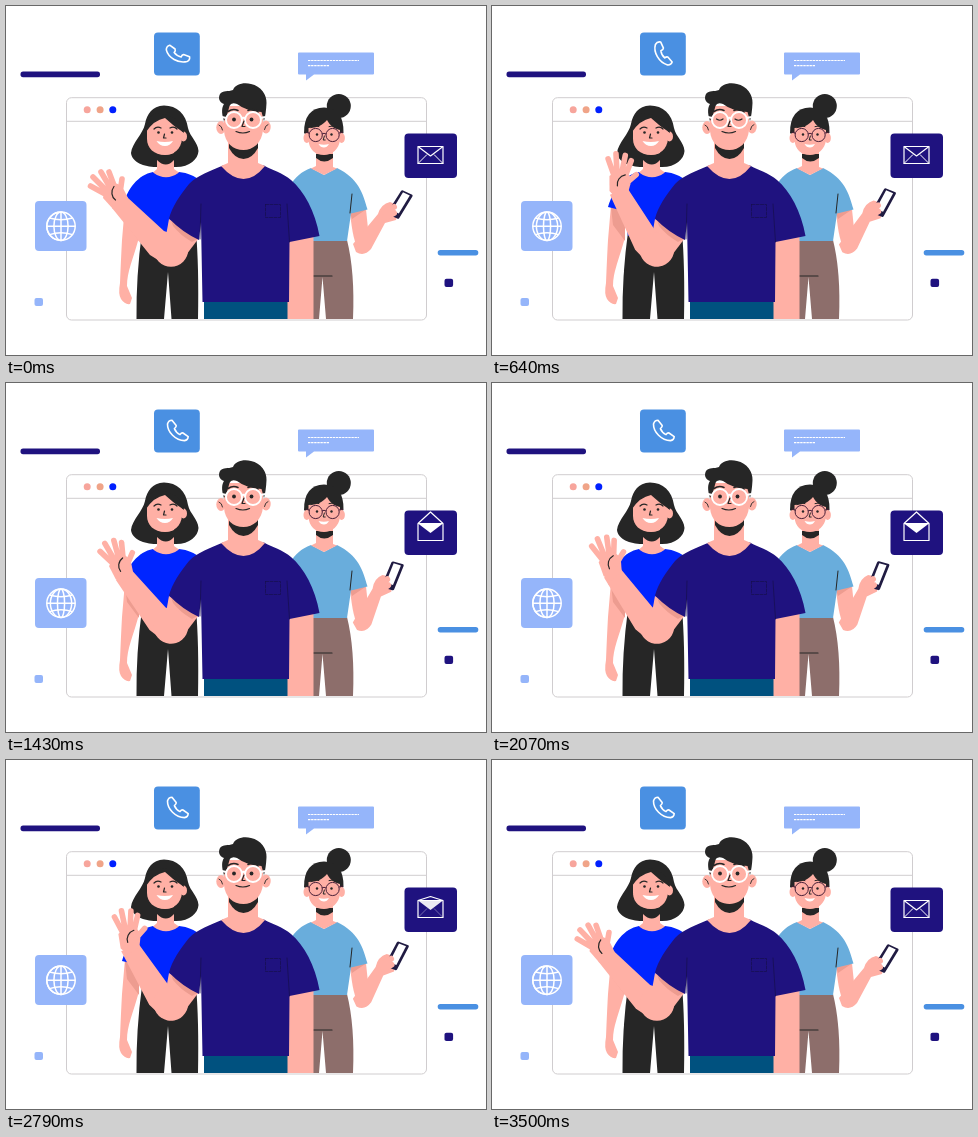
Recreate the animation shown at these times as an HTML page. Size 480 by 349 pixels, loop 3.57 s.

```html
<!DOCTYPE html>
<html lang="en">
<head>
<meta charset="utf-8">
<title>Team online</title>
<style>
html, body { margin: 0; width: 100%; height: 100%; overflow: hidden; background: #fff; }
svg { display: block; width: 100vw; height: 100vh; }
.navy { fill: #1f127f; }
.skin { fill: #ffb0a5; }
.shade { fill: #ed9c90; }
.dark { fill: #262626; }
.pale { fill: #95b5fa; }
.mid { fill: #4a90e2; }
.line { fill: none; stroke: #262626; stroke-linecap: round; stroke-linejoin: round; }
.white { fill: none; stroke: #fff; stroke-linejoin: round; }
.limb { fill: none; stroke: #ffb0a5; stroke-linecap: round; stroke-linejoin: round; }
</style>
</head>
<body>
<svg viewBox="0 0 480 349" stroke-width="1.2">
  <!-- browser window -->
  <rect x="60.5" y="91.7" width="360" height="222.3" rx="5" fill="#fff" stroke="#d0cdcf" stroke-width="1"/>
  <path d="M60.5 115.3H420.5" stroke="#d0cdcf" stroke-width="1"/>
  <circle cx="81.2" cy="103.7" r="3.5" fill="#f7a59c"/>
  <circle cx="94.1" cy="103.7" r="3.5" fill="#f0a488"/>
  <circle cx="106.8" cy="103.7" r="3.5" fill="#0020ff"/>

  <!-- loose decorations -->
  <rect class="navy" x="14.5" y="65.6" width="79.5" height="5.6" rx="2.6"/>
  <rect class="mid" x="431.7" y="244" width="40.6" height="5.4" rx="2.6"/>
  <rect class="pale" x="28.5" y="292" width="8.5" height="8" rx="2"/>
  <rect class="navy" x="438.5" y="272.8" width="8.6" height="8.3" rx="2"/>
  <path class="pale" d="M293 46.5H367Q368 46.5 368 47.5V67.5Q368 68.5 367 68.5H308L300 74.5V68.5H293Q292 68.5 292 67.5V47.5Q292 46.5 293 46.5Z"/>
  <path d="M302 54.5H353M302 59.6H323" stroke="#fff" stroke-dasharray="2.4 .7"/>

  <!-- call tile -->
  <rect class="mid" x="148" y="26.5" width="45.8" height="43" rx="4"/>
  <path id="call" class="white" stroke-width="1.6" d="M161.5 41Q162.5 37.3 166 37.3L170.2 42.4Q170.6 44 168.4 45.6Q170 49.7 174 51.6Q175.5 49.5 177 50L182.2 53.6Q182 57 178.5 57.6C169.5 57.5 161.3 49 161.5 41Z"/>

  <!-- globe tile -->
  <rect class="pale" x="29" y="195" width="51.5" height="50" rx="4"/>
  <g class="white" stroke-width="1.5">
    <circle cx="55" cy="220.3" r="14.2"/>
    <path d="M40.8 220.3H69.2M43.5 212Q55 215.500 66.500 212M43.500 228.600Q55 225 66.500 228.600"/>
    <path id="meridians"/>
  </g>

  <!-- mail tile -->
  <rect class="navy" x="398.5" y="127.5" width="52.5" height="44.5" rx="4"/>
  <rect class="white" x="412" y="140.5" width="25" height="17"/>
  <path id="folds" class="white" stroke-width="1" d="M412 157.5L421 148.500M437 157.500L428 148.500"/>
  <path id="letter" d="M412 140.5H437L424.5 150Z" fill="#fff"/>
  <path id="flap" class="white"/>

  <!-- woman on the left -->
  <path class="dark" d="M158 99.5C146 100 141 108 139 118C137 128 126 137 125 147C126 156 138 161 150 161H170C184 161 192 153 192.5 145C192 136 184 131 182 122C180 108 171 99.500 158 99.500Z"/>
  <path class="skin" d="M119 199L133 203L132 235C127 253 121 266 121 280L126 292L124 298Q119 299 115 293Q112 288 114 277Q115 252 116 234Z"/>
  <path class="shade" d="M119 202L133 203V235L121 219Z"/>
  <path class="dark" d="M136 226H190Q193 260 192 313H165.500L162 266L158 313H130.5Q130 270 136 226Z"/>
  <path d="M147 166C132 169 122 182 116 201L132 205L136 230H193V174C189 170 182 167 173 166Z" fill="#0025ff"/>
  <path class="skin" d="M151 143H168V163L173 166.5Q160 176 147 166.5L151 163Z"/>
  <path class="dark" d="M151 147Q160 150 168 147V154Q160 163 151 154Z"/>
  <ellipse class="skin" cx="177.5" cy="130.5" rx="3.5" ry="5"/>
  <path class="skin" d="M141 122C143 115 146 112 151 110Q168 111 176 123V133C175 143 168 149 159 149C148 149 141 142 141 133Z"/>
  <path class="dark" d="M140 126C139 112 148 106 153 108C166 108 178 116 178 127L174 124C169 121 164 116 159 112Q148 114 140 126Z"/>
  <path class="line" d="M148 123Q151 120 155 122M164 122Q168 120 171 123M158.5 128L157.5 132H160"/>
  <circle class="dark" cx="152.5" cy="126.5" r="1.3"/><circle class="dark" cx="166" cy="126.5" r="1.3"/>
  <path d="M150.500 135Q159 137 167 135Q164 140 159 140Q153.500 140 150.500 135Z" fill="#fff"/>

  <!-- woman on the right -->
  <path d="M300 234H341Q349 266 347 313H320L316.500 271L313 313H300Z" fill="#8d6e6b"/>
  <path class="line" d="M306 270H326"/>
  <path class="skin" d="M344 206L360 203.5L363 232Q360 247 353 244Q347 237 344 206Z"/>
  <g id="phoneArm">
    <path class="skin" d="M347 238L372 208Q375 198 384 196L394 200L390 214L379 217L365 243Q358 251 350 246Z"/>
    <path d="M397 184.5L406.2 188.8Q407 189.5 406.4 190.5L393.3 212Q392.5 213.3 391.2 212.6L382 208.2Q381 207.4 381.6 206.3L395 185Q396 184 397 184.5Z" fill="#201b42"/>
    <path d="M397 186.3L403.800 189.6L392.800 207.6L386 204.5Z" fill="#fff"/>
    <path class="limb" stroke-width="6" d="M379 206L388 201M380 211L388 207"/>
  </g>
  <path class="shade" d="M344 207L360 203.5L346 213Z"/>
  <path d="M305 162C295 166 289 171 284 180L290 235H341L345 207.5L361.5 203.5C357 187 352 172 331 162L318 169Z" fill="#69addc"/>
  <path class="line" stroke-width="1" d="M346 188L344 207"/>
  <path class="skin" d="M310 143H327V161L331 162.5L318 169L305 162.5L310 160Z"/>
  <path class="dark" d="M310 148H327V152Q318 159 310 152Z"/>
  <circle class="dark" cx="332.8" cy="100" r="12"/>
  <path class="dark" d="M298 127Q298 102 318 101.5Q338 102 337.500 127L331 132H304Z"/>
  <ellipse class="skin" cx="300.8" cy="132" rx="3.3" ry="5"/><ellipse class="skin" cx="335.6" cy="132" rx="3.3" ry="5"/>
  <path class="skin" d="M302.500 122C311 122 317 119 321 114C324 120 329 123 334 124V134C333 143 326 149 318 149C309 149 303 143 302.5 134Z"/>
  <path class="line" stroke-width="1" d="M305 121.5Q309 118.5 313 120.5M323 120.5Q327 118.5 331 122M318.4 130L317.2 134H319.2"/>
  <g fill="none" stroke="#4a2038" stroke-width="1"><circle cx="309.7" cy="129" r="6.6"/><circle cx="326.6" cy="129" r="6.6"/><path d="M316 128Q318 126.5 320 128M303 127L300 126M333 127L337 126"/></g>
  <circle class="dark" cx="311" cy="128.5" r="1.2"/><circle class="dark" cx="325.500" cy="128.5" r="1.2"/>
  <path d="M312.500 138Q318 139.500 323 138Q321 141.5 318 141.5Q314.500 141.5 312.500 138Z" fill="#fff"/>

  <!-- man: waving arm -->
  <path class="skin" d="M163 213L193 232L174 257Q165 262 155 257Z"/>
  <g id="foreArm">
    <path class="skin" d="M121 191L158 225L178 232L152 254L144 249L106 202Z"/>
    <circle class="skin" cx="165" cy="243.500" r="17.300"/>
    <g id="hand">
      <path class="skin" d="M99 182Q106 175 114 179L118 184L122 192L116 204L107 203L97 192Z"/>
      <path class="limb" stroke-width="5.600" d="M101 189L84.5 180M102 186L87 171M105 183L95 166M109 182L103 166M114 187L116 173"/>
      <path class="line" d="M108 180.5C104.5 185 105.5 191 109.5 194"/>
    </g>
  </g>
  <path class="shade" d="M165 214L193 232L186 236Q174 229 167 220Z"/>

  <!-- man: body -->
  <path class="skin" d="M280 234L307.5 230V313H280Z"/>
  <rect x="198" y="294" width="83.5" height="19" fill="#00517f"/>
  <path class="navy" d="M217 159.500C204 165 192 169 183 178C174 189 166 201 163 212.5Q176 226 193 234L195 216L196.5 296H283L283.5 236L313.5 230C309 205 298 185 285 174C277 167 266 164 258 159.500Z"/>
  <path class="line" stroke-width=".8" d="M195 198L194 233M281 198L283.5 236" style="stroke:#171052"/>
  <rect class="line" x="259.500" y="198.500" width="15" height="13" stroke-width=".8" stroke-dasharray="3 1.500" style="stroke:#171052"/>
  <path class="skin" d="M222 136H252V157L259 160Q238 186 215 160L222 157Z"/>
  <path class="dark" d="M223 132H252V142Q246 153 237.5 153Q229 153 223 142Z"/>

  <!-- man: head -->
  <ellipse class="skin" cx="215" cy="121.5" rx="4.7" ry="6.5"/>
  <ellipse class="skin" cx="260" cy="121" rx="4.7" ry="6.5"/>
  <path class="line" stroke-width=".9" d="M213 119Q216 120 216.500 124M262 118.500Q259 119.500 258.500 123.500"/>
  <path class="skin" d="M218 100H257V124C256 137 247 144 237.5 144C227 144 219 137 218 125Z"/>
  <path class="dark" d="M218 115C215 106 216 101 218 98C213 96 212 92 214 88C217 84 222 86 227 84C229 78 238 76 245 78C255 80 261 89 260.500 97Q260 108 258 115L255.500 106Q240 105 231 98Q225 96 223.500 100Q222 108 218 115Z"/>
  <path class="line" stroke-width="1.6" d="M222 105.5Q227 102 232 104.5M242 104.5Q248 102 252 106"/>
  <g id="eyes" class="dark"><circle cx="228" cy="113.5" r="1.9"/><circle cx="245.5" cy="113.5" r="1.9"/></g>
  <path id="lids" class="line" d="M224.5 113Q228 115.5 231 113M243 113Q246.5 115.5 250 113"/>
  <g class="white" stroke-width="1.9"><circle cx="228" cy="114" r="8"/><circle cx="247" cy="114" r="8"/><path d="M236 112.5Q237.5 111 239 112.5M220 112L216 111M255 112L259 111"/></g>
  <path class="line" d="M238 115L236 120.5H239M230 125.5Q237 128.5 243.5 125.5"/>
</svg>
<script>
const LOOP = 3570, TAU = Math.PI * 2;
const get = id => document.getElementById(id);
const set = (id, name, value) => get(id).setAttribute(name, value);
const spin = (id, angle, x, y) => set(id, "transform", `rotate(${angle} ${x} ${y})`);
const sway = (t, period) => (1 - Math.cos(TAU * t / period)) / 2;
const ramp = (t, from, to) => {
  const u = Math.min(1, Math.max(0, (t - from) / (to - from)));
  return u * u * (3 - 2 * u);
};
const near = (t, mid) => Math.abs(t - mid) < 75;

// The globe turns a little and back once per loop.
function globe(t) {
  const shift = t < 2070 ? .37 * sway(t, 2070) : 0;
  let d = "";
  for (let u = -1; u < 1; u += .5) {
    const x = 14.2 * (u + shift);
    d += `M55 206.1A${Math.abs(x)} 14.2 0 0 ${x > 0 ? 1 : 0} 55 234.5`;
  }
  set("meridians", "d", d);
}

function draw() {
  const t = performance.now() % LOOP;
  const wave = sway(t, LOOP / 3);
  spin("foreArm", 14.5 * wave, 165, 243);
  spin("hand", 28 * wave, 115, 196);
  spin("phoneArm", -10.4 * sway(t, LOOP), 356, 240);

  const ring = t < 960 ? -15 * Math.cos(TAU * t / 427) : 0;
  spin("call", ring, 172, 47);
  globe(t);

  const open = ramp(t, 900, 1250) - ramp(t, 2650, 3000);
  set("flap", "d", `M412 140.5L424.5 ${150 - 21 * open}L437 140.5`);
  set("letter", "opacity", ramp(open, .4, .7));
  set("folds", "opacity", 1 - open);

  const blink = near(t, 640) || near(t, 2500);
  set("eyes", "opacity", blink ? 0 : 1);
  set("lids", "opacity", blink ? 1 : 0);
  requestAnimationFrame(draw);
}
draw();
</script>
</body>
</html>
```
